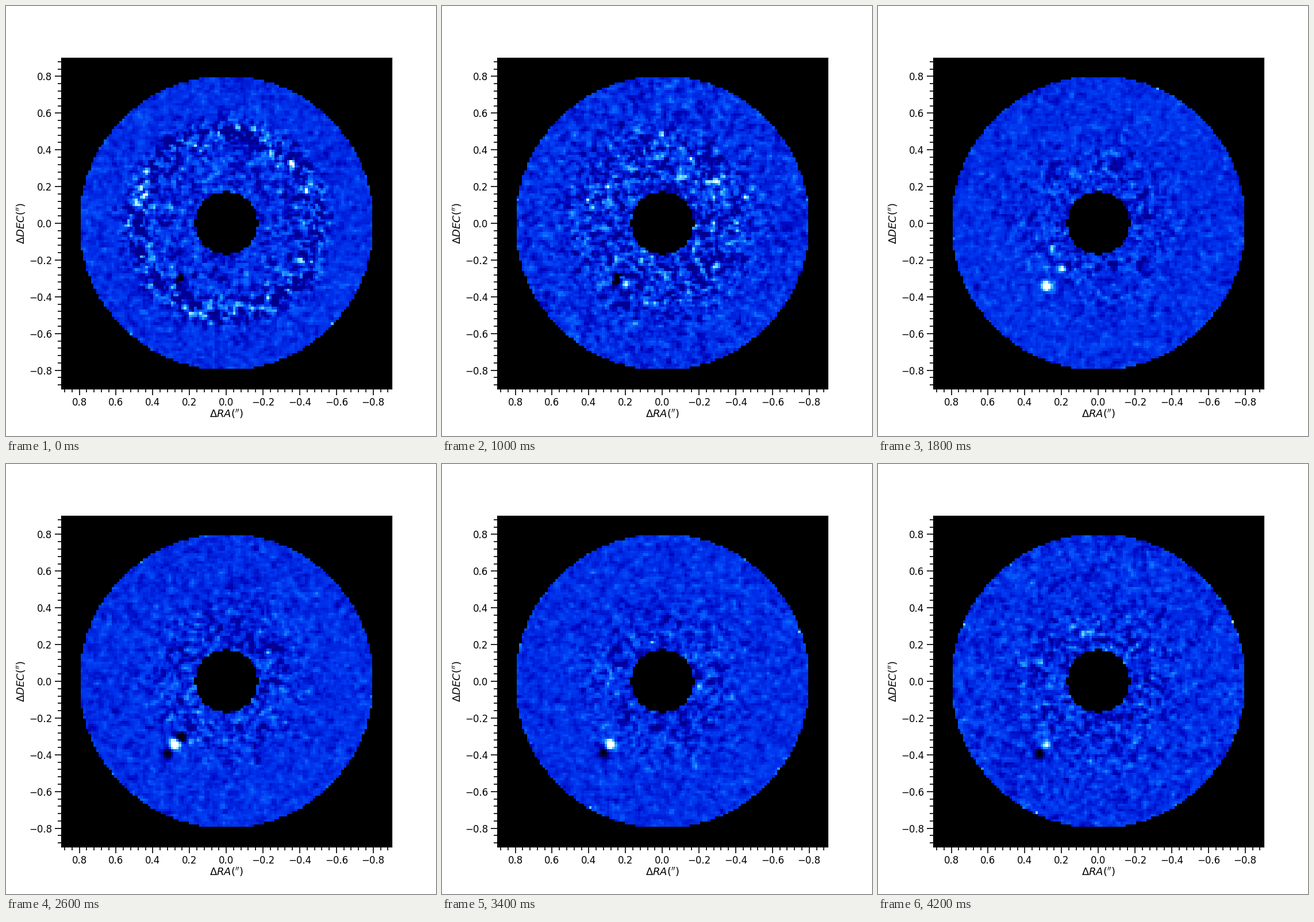
Animation, 748 px wide and 748 px high, one loop 4400 ms. Source, as a matplotlib script:

```python
import numpy as np
import matplotlib.pyplot as plt
from matplotlib.animation import FuncAnimation
from matplotlib.colors import LinearSegmentedColormap
from matplotlib.ticker import AutoMinorLocator, MultipleLocator

SIZE, DPI = 748, 100
FRAMES, INTERVAL = 22, 200
N = 121                # detector pixels per side
SCALE = 0.01402        # arcsec per detector pixel
BASE = 0.36
PLANET = np.array([0.281, -0.345])

plt.rcParams["font.family"] = "DejaVu Sans"

blues = LinearSegmentedColormap.from_list("blues", [
    (0.00, (0, 0, 0)),
    (0.15, (0, 0, 0.52)),
    (0.25, (0, 0.02, 0.74)),
    (0.37, (0, 0.20, 0.93)),
    (0.50, (0.04, 0.40, 1)),
    (0.62, (0.15, 0.60, 1)),
    (0.78, (0.47, 0.88, 1)),
    (0.95, (1, 1, 1)),
    (1.00, (1, 1, 1)),
])

idx = np.arange(N) - N // 2
row, col = np.meshgrid(idx, idx, indexing="ij")
X, Y = -col * SCALE, row * SCALE
r_pix = np.hypot(row, col)
R = r_pix * SCALE
hidden = (r_pix >= 57) | (r_pix < 12.1)
rim = r_pix > 56.3


def ease(i, start, end):
    t = np.clip((i - start) / (end - start), 0, 1)
    return t * t * (3 - 2 * t)


def bump(i, centre, width=2):
    return np.exp(-((i - centre) / width) ** 2)


def spot(centre, spread=0.018):
    x, y = centre
    return np.exp(-((X - x) ** 2 + (Y - y) ** 2) / (2 * spread ** 2))


def soften(a, axis, weight):
    return a + weight * (np.roll(a, 1, axis) + np.roll(a, -1, axis))


rng = np.random.default_rng(12)
noise = rng.normal(size=(FRAMES, N, N))
for axis, weight in enumerate((0.3, 0.3, 0.35)):
    noise = soften(noise, axis, weight)
noise /= noise.std()
sparks = (rng.random(noise.shape) < 0.02) * rng.uniform(0.1, 0.4, noise.shape)


def noise_level(i):
    """Bright halo that shrinks from a thin ring to a glow round the mask."""
    radius = 0.49 - 0.25 * ease(i, 0, 9)
    width = 0.045 + 0.085 * ease(i, 0, 4)
    ring = (0.06 + 0.08 * bump(i, 0)) * np.exp(-0.5 * ((R - radius) / width) ** 2)
    inside = 0.05 * (1 - ease(i, 4, 9)) / (1 + np.exp((R - radius - width) / 0.03))
    outside = 0.04 + 0.015 * bump(i, 5) + 0.012 * bump(i, 21)
    return ring + inside + outside, ring + inside


def companion(i):
    """Planet with its dark copies on the line to the star, and a side lobe."""
    planet = 1.15 * ease(i, 5, 9) * (1 - 0.55 * ease(i, 19, 21))
    near = 0.4 * bump(i, 0) + 0.75 * bump(i, 5) + 0.6 * bump(i, 13)
    far = 0.4 * ease(i, 9, 13) * (1 - 0.4 * bump(i, 19, 1))
    lobe = 0.75 * bump(i, 5) + 0.3 * bump(i, 14)
    return (planet * spot(PLANET)
            - near * spot(PLANET * 0.875)
            - far * spot(PLANET * 1.14, 0.021)
            + lobe * spot((0.195, -0.33), 0.014)
            + 0.7 * bump(i, 9) * spot((0.2, -0.245), 0.012))


def sky(i):
    level, halo = noise_level(i)
    n = noise[i]
    n = np.where(n > 0, n * (0.75 + 0.15 * n), n)
    img = np.maximum(BASE - 0.2 * halo + level * n, 0.17)
    img += companion(i) + rim * sparks[i]
    return np.ma.array(np.clip(img, 0, 1), mask=hidden)


fig = plt.figure(figsize=(SIZE / DPI, SIZE / DPI), dpi=DPI, facecolor="white")
left, bottom, side = 95.6, 82.4, 575.1
ax = fig.add_axes([left / SIZE, bottom / SIZE, side / SIZE, side / SIZE],
                  facecolor="black")
half = N * SCALE / 2
image = ax.imshow(sky(0), cmap=blues, vmin=0, vmax=1, origin="lower",
                  extent=[half, -half, -half, half],
                  interpolation="nearest", aspect="auto")
ax.set_xlim(0.9, -0.9)
ax.set_ylim(-0.9, 0.9)
for axis in (ax.xaxis, ax.yaxis):
    axis.set_major_locator(MultipleLocator(0.2))
    axis.set_minor_locator(AutoMinorLocator(5))
    axis.set_major_formatter("{x:.1f}")
ax.tick_params(which="major", length=8, width=1.2, labelsize=12, pad=3)
ax.tick_params(which="minor", length=4, width=1.2)

label = dict(size=13, ha="center", va="center")
fig.text(384 / SIZE, 1 - 709 / SIZE, r"$\Delta RA('')$", **label)
fig.text(26.5 / SIZE, 1 - 378 / SIZE, r"$\Delta DEC('')$", rotation=90, **label)


def update(i):
    image.set_data(sky(i))
    return [image]


anim = FuncAnimation(fig, update, frames=FRAMES, interval=INTERVAL,
                     repeat=True, repeat_delay=0)
plt.show()
```
